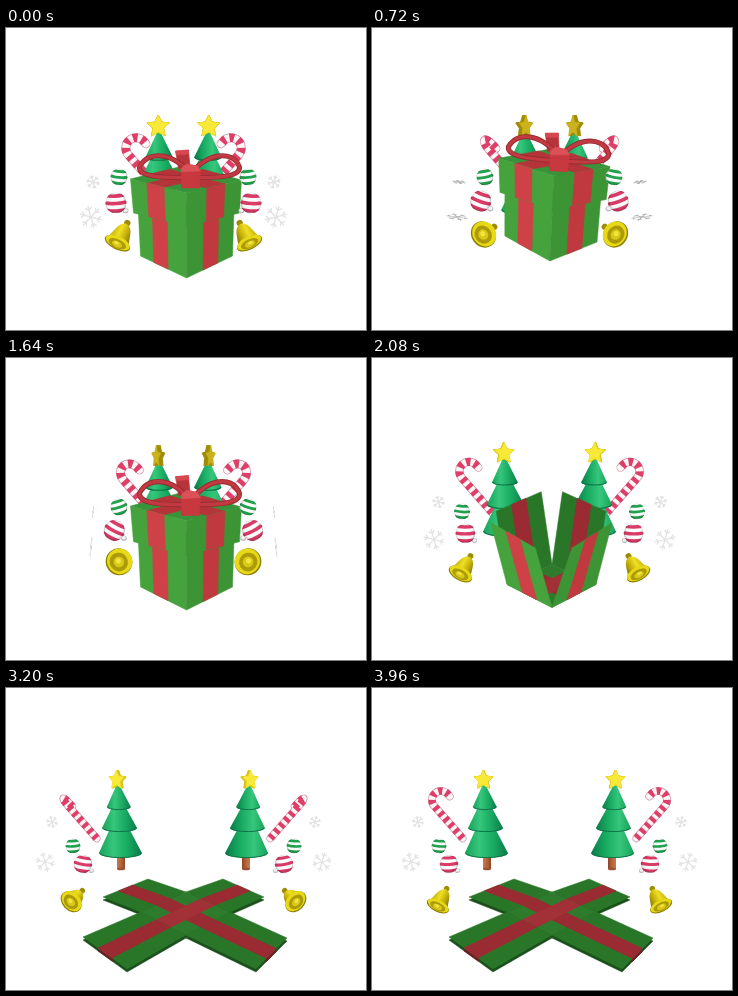
Recreate the animation shown at these times as an HTML page with a canvas. Size 360 px wide and 302 px high, loop 4000 ms.

```html
<!DOCTYPE html>
<html lang="en">
<head>
<meta charset="utf-8">
<title>Gift box</title>
<style>
html, body { margin: 0; width: 100%; height: 100%; overflow: hidden; background: #fff; }
canvas { display: block; width: 360px; height: 302px; }
</style>
</head>
<body>
<canvas id="stage" width="360" height="302"></canvas>
<script>
const ctx = document.getElementById('stage').getContext('2d');
const LOOP = 4000, STEP = 40, TAU = Math.PI * 2;
const GREEN = { left: '#45a23c', right: '#3c9435', top: '#38933a', inside: '#2a7629', edge: '#1a4f1c' };
const RED = { left: '#cd4147', right: '#c0393f', top: '#b5343a', inside: '#9a2b32', edge: '#701c22' };

const lerp = (a, b, k) => a + (b - a) * k;
const mix = (p, q, k) => [lerp(p[0], q[0], k), lerp(p[1], q[1], k)];
const part = (t, from, to) => Math.min(1, Math.max(0, (t - from) / (to - from)));
const ramp = (t, from, to) => {
  const k = part(t, from, to);
  return k * k * (3 - 2 * k);
};
const arc = (t, from, to) => Math.sin(Math.PI * part(t, from, to));

function shape(points, fill) {
  ctx.beginPath();
  points.forEach(p => ctx.lineTo(p[0], p[1]));
  ctx.closePath();
  ctx.fillStyle = ctx.strokeStyle = fill;
  ctx.lineWidth = .5;
  ctx.fill();
  ctx.stroke();
}

function oval(x, y, rx, ry, fill) {
  ctx.beginPath();
  ctx.ellipse(x, y, Math.max(rx, .3), Math.max(ry, .3), 0, 0, TAU);
  ctx.fillStyle = fill;
  ctx.fill();
}

function shade(x0, x1, ...colors) {
  const g = ctx.createLinearGradient(x0, 0, x1, 0);
  colors.forEach((c, i) => g.addColorStop(i / (colors.length - 1), c));
  return g;
}

// Quad a-b-c-d with a ribbon running from edge ab to edge dc.
function striped(a, b, c, d, from, to, green, red) {
  shape([a, b, c, d], green);
  shape([mix(a, b, from), mix(a, b, to), mix(d, c, to), mix(d, c, from)], red);
}

// Draws a part on both sides, moving from its packed to its spread place.
function pair(packed, spread, k, draw) {
  for (const side of [1, -1]) {
    ctx.save();
    if (side < 0) { ctx.translate(355, 0); ctx.scale(-1, 1); }
    ctx.translate(...mix(packed, spread, k));
    const size = lerp(1.14, 1, k);
    ctx.scale(size, size);
    draw();
    ctx.restore();
  }
}

function snowflake(r, t) {
  const flip = (1 - Math.cos(TAU * (t - 80) / 1000)) / 2;
  const axis = (t - 1640) / 920 * Math.PI / 2 + .1;
  ctx.rotate(axis);
  ctx.scale(Math.max(.07, Math.cos(flip * Math.PI / 2)), 1);
  ctx.rotate(-axis);
  ctx.beginPath();
  for (let i = 0; i < 6; i++) {
    const a = i * TAU / 6 + .25;
    const at = (d, turn = 0) => [Math.cos(a + turn) * d * r, Math.sin(a + turn) * d * r];
    ctx.moveTo(0, 0);
    ctx.lineTo(...at(1));
    ctx.moveTo(...at(.9, .3));
    ctx.lineTo(...at(.58));
    ctx.lineTo(...at(.9, -.3));
  }
  ctx.lineWidth = 1.2;
  ctx.strokeStyle = flip > .6 ? '#a8a8a8' : '#e3e3e3';
  ctx.stroke();
}

// The hook swings around the straight stem.
function cane(t) {
  const w = Math.cos(Math.PI / 4 * (1 - Math.cos(TAU * t / 2000)));
  const half = Math.max(9 * w, .1);
  ctx.rotate(-.72);
  ctx.translate(-9, 0);
  ctx.beginPath();
  ctx.moveTo(0, 43);
  ctx.lineTo(0, 0);
  ctx.ellipse(half, 0, half, 9, 0, Math.PI, TAU);
  ctx.lineTo(half * 2, 3);
  ctx.lineCap = 'round';
  for (const [color, width] of [['#c995a5', 7.8], ['#fff4f6', 6.4]]) {
    ctx.strokeStyle = color;
    ctx.lineWidth = width;
    ctx.stroke();
  }
  ctx.lineCap = 'butt';
  ctx.setLineDash([4, 3.6]);
  ctx.strokeStyle = '#dd3f69';
  ctx.lineWidth = 7.6;
  ctx.stroke();
  ctx.setLineDash([]);
}

function star(t) {
  const turn = TAU * t / 2000, w = Math.cos(turn), depth = Math.sin(turn) * 2;
  const points = dx => Array.from({ length: 10 }, (_, i) => {
    const a = i * TAU / 10 - TAU / 4, r = i % 2 ? 4.8 : 10;
    return [Math.cos(a) * r * w + dx, Math.sin(a) * r];
  });
  const bright = Math.abs(w) > .7;
  for (let i = -1; i < 1; i += .25) shape(points(depth * i), bright ? '#d8c21c' : '#a08c08');
  shape(points(depth), bright ? '#f8e838' : '#c9b21c');
}

function tree(t, k) {
  const top = lerp(-1, -3, k);
  ctx.fillStyle = shade(-4, 4, '#c8784e', '#b5643c', '#8b4628');
  ctx.fillRect(-4, -17, 8, 17);
  oval(0, 0, 4, 1.3, '#9b5230');
  const tiers = [[-58, -16, 21.5, 5], [-73, -41, 17.5, 4], [-85, -62, 12, 3]];
  for (const [peak, base, half, ry] of tiers) {
    const x = top * -base / 85, tip = top * -peak / 85;
    ctx.beginPath();
    ctx.moveTo(tip - 1, peak);
    ctx.lineTo(x - half, base);
    ctx.ellipse(x, base, half, ry, 0, Math.PI, 0, true);
    ctx.lineTo(tip + 1, peak);
    ctx.fillStyle = shade(x - half, x + half, '#17a35b', '#36c67c', '#18aa61', '#0c7a49');
    ctx.fill();
    ctx.strokeStyle = '#0e7346';
    ctx.lineWidth = 1;
    ctx.beginPath();
    ctx.ellipse(x, base - .4, half - .5, ry, 0, .05, Math.PI - .05);
    ctx.stroke();
  }
  ctx.translate(top - .5, -89);
  star(t);
}

function ball(r, tilt, color, capped) {
  if (capped) {
    oval(r * .9, r * .72, 2.6, 2.3, '#bbb');
    oval(r * .9, r * .68, 1.8, 1.5, '#f4f4f4');
  }
  ctx.save();
  ctx.beginPath();
  ctx.arc(0, 0, r, 0, TAU);
  ctx.clip();
  ctx.fillStyle = '#fff';
  ctx.fillRect(-r, -r, 2 * r, 2 * r);
  ctx.rotate(tilt);
  ctx.strokeStyle = color;
  ctx.lineWidth = r * .34;
  for (const y of [-.85, -.15, .55]) {
    ctx.beginPath();
    ctx.ellipse(0, y * r, r * 1.05, r * .2, 0, 0, Math.PI);
    ctx.stroke();
  }
  const g = ctx.createRadialGradient(-r * .25, -r * .3, r * .3, 0, 0, r);
  g.addColorStop(0, 'rgba(0,0,0,0)');
  g.addColorStop(.75, 'rgba(0,0,0,.04)');
  g.addColorStop(1, 'rgba(0,0,0,.28)');
  oval(0, 0, r, r, g);
  ctx.restore();
}

function bell(swing) {
  const pitch = lerp(.48, 1.48, swing);
  const reach = 20 * Math.cos(pitch), open = Math.sin(pitch);
  ctx.translate(0, -6 * swing);
  ctx.rotate(lerp(.45, .95, Math.min(1, swing * 2)));
  const rim = reach * .4, tip = rim - reach;
  oval(0, tip - 2, 2.8, 2.8, '#9d8c08');
  ctx.beginPath();
  ctx.moveTo(-11, rim);
  ctx.bezierCurveTo(-7, lerp(rim, tip, .35), -8, tip, 0, tip - 1);
  ctx.bezierCurveTo(8, tip, 7, lerp(rim, tip, .35), 11, rim);
  ctx.fillStyle = shade(-9, 10, '#c8b40c', '#efdf24', '#c2ad0a', '#7e6d04');
  ctx.fill();
  oval(0, rim, 12, 12 * open, '#8f7f06');
  oval(0, rim - .8, 11.4, 11.4 * open, '#e8d916');
  oval(0, rim + .3, 8.3, 8.3 * open, '#ab9a0a');
  oval(0, rim + 1.5 * (1 - open), 4.8, 4.8 * Math.max(open, .55), '#d9c816');
  oval(-1, rim, 2.3, 2.3 * Math.max(open, .5), '#f2e540');
}

function ribbonLoop(dir) {
  ctx.beginPath();
  ctx.moveTo(4 - dir, -101);
  ctx.bezierCurveTo(4 + dir * 12, -124, 4 + dir * 42, -130, 3 + dir * 50, -111);
  ctx.bezierCurveTo(3 + dir * 51, -99, 4 + dir * 18, -101, 4, -100);
  ctx.lineJoin = 'round';
  for (const [color, width] of [['#962a30', 5], ['#c23a41', 3.2]]) {
    ctx.lineWidth = width;
    ctx.strokeStyle = color;
    ctx.stroke();
  }
}

// Box parts are placed from the bottom front corner.
function boxBody() {
  striped([0, -72], [-49, -84], [-46, -22], [0, 0], .4, .71, GREEN.left, RED.left);
  striped([0, -72], [48, -84], [46, -22], [0, 0], .36, .68, GREEN.right, RED.right);
}

function boxLid() {
  const left = [-56, -99], front = [0, -85], right = [55, -98], back = [0, -113];
  striped(left, front, right, back, .3, .6, GREEN.top, RED.top);
  shape([mix(front, right, .37), mix(front, right, .7), mix(left, back, .7), mix(left, back, .37)], RED.top);
  striped(front, left, [-53, -65], [0, -52], .4, .71, GREEN.left, RED.left);
  striped(front, right, [53, -65], [0, -52], .37, .7, GREEN.right, RED.right);
  shape([[-11, -127], [2, -128], [4, -108], [-8, -109]], '#b7343b');
  shape([[-11, -127], [2, -128], [2, -124], [-10, -123]], '#d5484e');
  ribbonLoop(-1);
  ribbonLoop(1);
  shape([[-5, -110], [0, -114], [11, -112], [14, -107], [13, -90], [-5, -90]], '#c7383f');
  shape([[-5, -110], [0, -114], [11, -112], [14, -107], [-5, -106]], '#dc5057');
}

// Four walls hinged on the base; fold 0 is upright, 1 is flat.
function walls(fold) {
  const west = [135, 222], north = [180, 202], east = [224, 222], south = [180, 245];
  const out = Math.sin(fold * Math.PI / 2), height = 72 * Math.cos(fold * Math.PI / 2);
  const lift = (base, flat) => {
    const [x, y] = mix(base, flat, out);
    return [x, y - height];
  };
  const panels = [
    [west, north, [142, 189], [97, 207]],
    [north, east, [258, 207], [217, 189]],
    [south, west, [77, 247], [121, 279], 'left'],
    [east, south, [250, 279], [281, 248], 'right']
  ].map(([a, b, endB, endA, face]) => [a, b, lift(b, endB), lift(a, endA), face]);
  const base = [west, north, east, south];
  ctx.save();
  ctx.translate(0, lerp(5, 2, fold));
  if (fold > .97) {
    ctx.save();
    ctx.translate(0, 3);
    shape(base, GREEN.edge);
    for (const [a, b, c, d] of panels) striped(a, b, c, d, .34, .66, GREEN.edge, RED.edge);
    ctx.restore();
  }
  striped(...base, .34, .66, '#2f7b2d', RED.inside);
  shape([mix(north, east, .34), mix(north, east, .66), mix(west, south, .66), mix(west, south, .34)], '#a23037');
  for (const [a, b, c, d, face] of panels) {
    const area = (b[0] - a[0]) * (d[1] - a[1]) - (b[1] - a[1]) * (d[0] - a[0]);
    const look = face && area > 0 ? face : 'inside';
    striped(a, b, c, d, .34, .66, GREEN[look], RED[look]);
  }
  ctx.restore();
}

function openBox(t) {
  walls(ramp(t, 1960, 2400));
  const rise = ramp(t, 1760, 2240);
  if (rise === 1) return;
  ctx.save();
  ctx.translate(180, 250 - 270 * rise);
  ctx.rotate(.16 * rise);
  boxLid();
  ctx.restore();
}

// A small hop, then a high one with a lean, each ending in a heavy landing.
function closedBox(t) {
  const lean = arc(t, 640, 1560);
  const up = 43 * arc(t, 20, 480) + 63 * lean;
  const land = arc(t, 480, 660) + arc(t, 1540, 1740);
  ctx.save();
  ctx.translate(180.5 - 10 * lean, 250 - up + 2 * land);
  ctx.transform(1 + .01 * lean, .25 * lean, -.19 * lean, 1 + .05 * land, 0, 0);
  boxBody();
  boxLid();
  ctx.restore();
}

function draw(t) {
  ctx.fillStyle = '#fff';
  ctx.fillRect(0, 0, 360, 302);
  const k = ramp(t, 1760, 2400);
  const swing = (1 - Math.cos(TAU * t / 1000)) / 2;
  const tuck = 5 * (1 - ramp(t, 0, 360));
  pair([87, 154], [46, 134], k, () => snowflake(6, t));
  pair([85, 189], [39, 174], k, () => snowflake(10, t));
  pair([125 + tuck, 115 + tuck], [69, 112], k, () => cane(t));
  pair([154, 200], [115, 181], k, () => tree(t, k));
  (t < 1760 ? closedBox : openBox)(t);
  pair([113, 149], [67, 158], k, () => ball(7.5, .1 - swing * .5, '#22a44f', false));
  pair([110 - 2 * swing, 175 - 3 * swing], [77, 176], k, () => ball(9.3, swing * .65 - .05, '#dc3c68', true));
  pair([115, 208], [69, 212], k, () => bell(swing));
}

function tick(now) {
  draw(Math.floor(now % LOOP / STEP) * STEP);
  requestAnimationFrame(tick);
}
draw(0);
requestAnimationFrame(tick);
</script>
</body>
</html>
```
